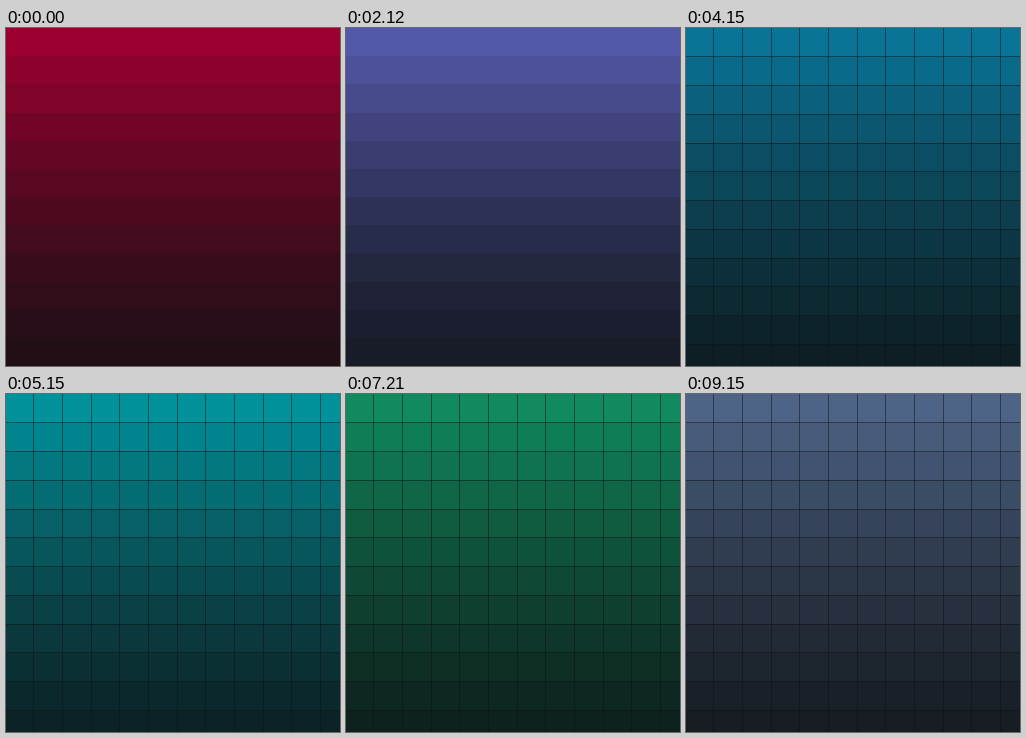
Write an HTML page with a canvas that moves like this. It is 334 px wide and 338 px high and loops after 10000 ms.

```html
<!DOCTYPE html>
<html lang="en">
<head>
<meta charset="utf-8">
<style>
  html, body { margin: 0; width: 100%; height: 100%; overflow: hidden; background: #111; }
  canvas { display: block; }
</style>
</head>
<body>
<canvas id="stage" width="334" height="338"></canvas>
<script>
const W = 334, H = 338, ROWS = 12, LOOP = 10000;
const RED = '#9b0030', GREEN = '#2e6b12', INDIGO = '#5458a8', PURPLE = '#7a54b8', CYAN = '#0a7496',
  TEAL = '#00919b', EMERALD = '#0c9640', JADE = '#108a5e', SLATE = '#4e6487', NIGHT = '#0e1113';
const themes = [RED, GREEN, INDIGO, PURPLE, CYAN, TEAL, EMERALD, JADE, RED, SLATE];
const ctx = document.getElementById('stage').getContext('2d');

const ramp = (t, from, to) => Math.min(1, Math.max(0, (t - from) / (to - from)));

// One theme a second, with a short delay that builds up at first
const startOf = i => 1000 * i + Math.min(150, 60 * i);

function draw(t) {
  const theme = themes.findLast((_, i) => t >= startOf(i));
  const open = ramp(t, 3850, 3940);
  const dim = ramp(t, 8149, 8150) - ramp(t, 8940, 9150);
  const rowPitch = H / ROWS + 0.61 * open;
  const colPitch = H / ROWS + 0.5 * open;

  // The theme fades into the night colour towards the bottom
  for (let i = 0; i < ROWS; i++) {
    const y = Math.round(i * rowPitch);
    ctx.globalAlpha = 1;
    ctx.fillStyle = NIGHT;
    ctx.fillRect(0, y, W, H - y);
    ctx.globalAlpha = 0.14 + 0.86 * (1 - i / (ROWS - 1)) ** 1.27;
    ctx.fillStyle = theme;
    ctx.fillRect(0, y, W, H - y);
  }

  // Thin gaps between the cells
  ctx.globalAlpha = 0.5 * open * (1 - 0.6 * dim);
  ctx.fillStyle = NIGHT;
  for (let i = 1; i < ROWS; i++) {
    ctx.fillRect(Math.floor(i * colPitch - 1), 0, 1, H);
    ctx.fillRect(0, Math.floor(i * rowPitch), W, 1);
  }
}

const start = performance.now();
function tick() {
  draw((performance.now() - start) % LOOP);
  requestAnimationFrame(tick);
}
tick();
</script>
</body>
</html>
```
